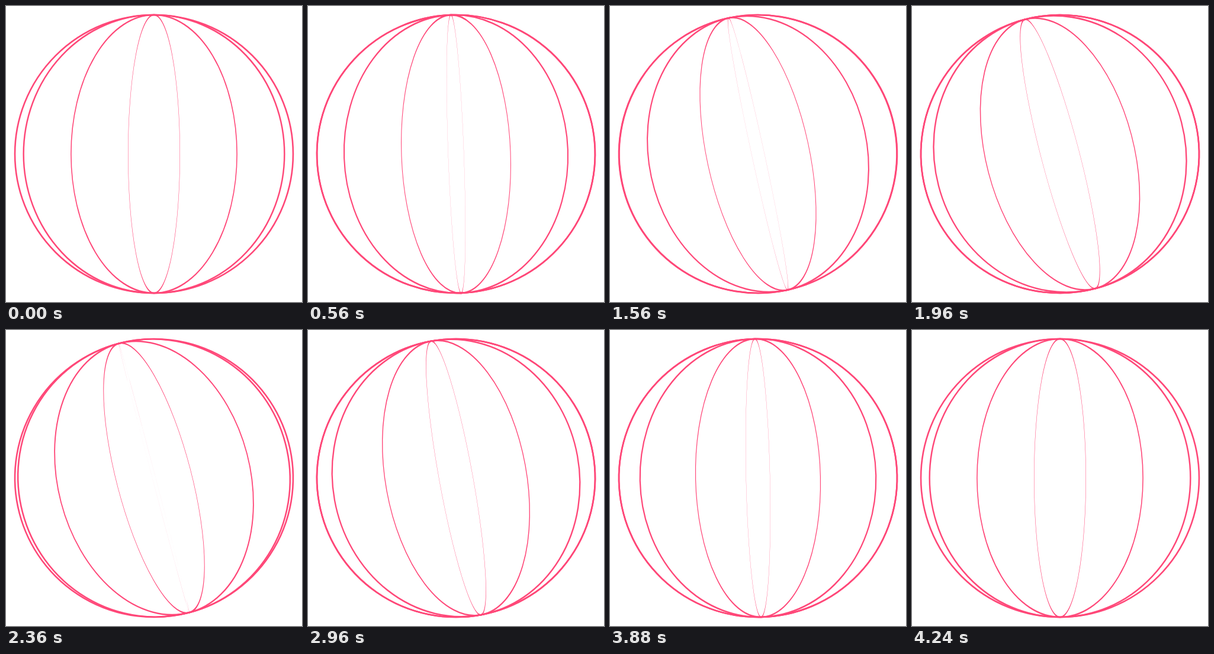
These frames come from a looping animation (500 by 500 pixels, 4280 ms). An HTML page with a canvas:

```html
<!DOCTYPE html>
<html>
<head>
<meta charset="utf-8">
<title>Turning globe</title>
<style>
  html, body { margin: 0; width: 100%; height: 100%; overflow: hidden; background: #fff; }
  canvas { display: block; }
</style>
</head>
<body>
<canvas id="stage" width="500" height="500"></canvas>
<script>
const ctx = document.getElementById('stage').getContext('2d');
const LOOP = 4280, CYCLE = 4240, STEP = 40;
const RADIUS = 235, RINGS = 4, TILT = 15, TILT_LAG = 40;
const RAD = Math.PI / 180;

const easeSine = x => (1 - Math.cos(Math.PI * x)) / 2;

// The stroke is squeezed along with the ring, so narrow rings get thin sides.
function ring(width) {
  if (width < 0.001) return;
  ctx.save();
  ctx.scale(width, 1);
  ctx.beginPath();
  ctx.arc(0, 0, RADIUS, 0, 2 * Math.PI);
  ctx.stroke();
  ctx.restore();
}

function draw(t) {
  ctx.setTransform(1, 0, 0, 1, 0, 0);
  ctx.fillStyle = '#fff';
  ctx.fillRect(0, 0, 500, 500);
  ctx.translate(250, 250);
  ctx.rotate(-TILT * RAD * easeSine(2 * (t - TILT_LAG) / CYCLE));
  ctx.strokeStyle = '#ff4778';
  ctx.lineWidth = 2.6;
  ring(1);
  // Each ring opens over 90% of its cycle, then rests on the outline.
  for (let i = 0; i < RINGS; i++) {
    const phase = (t / CYCLE + i / RINGS + 0.0055) % 1;
    ring(easeSine(Math.min(phase / 0.9, 1)));
  }
}

const start = performance.now();
function frame() {
  const t = (performance.now() - start) % LOOP;
  draw(Math.floor(t / STEP) * STEP);
  requestAnimationFrame(frame);
}
frame();
</script>
</body>
</html>
```
